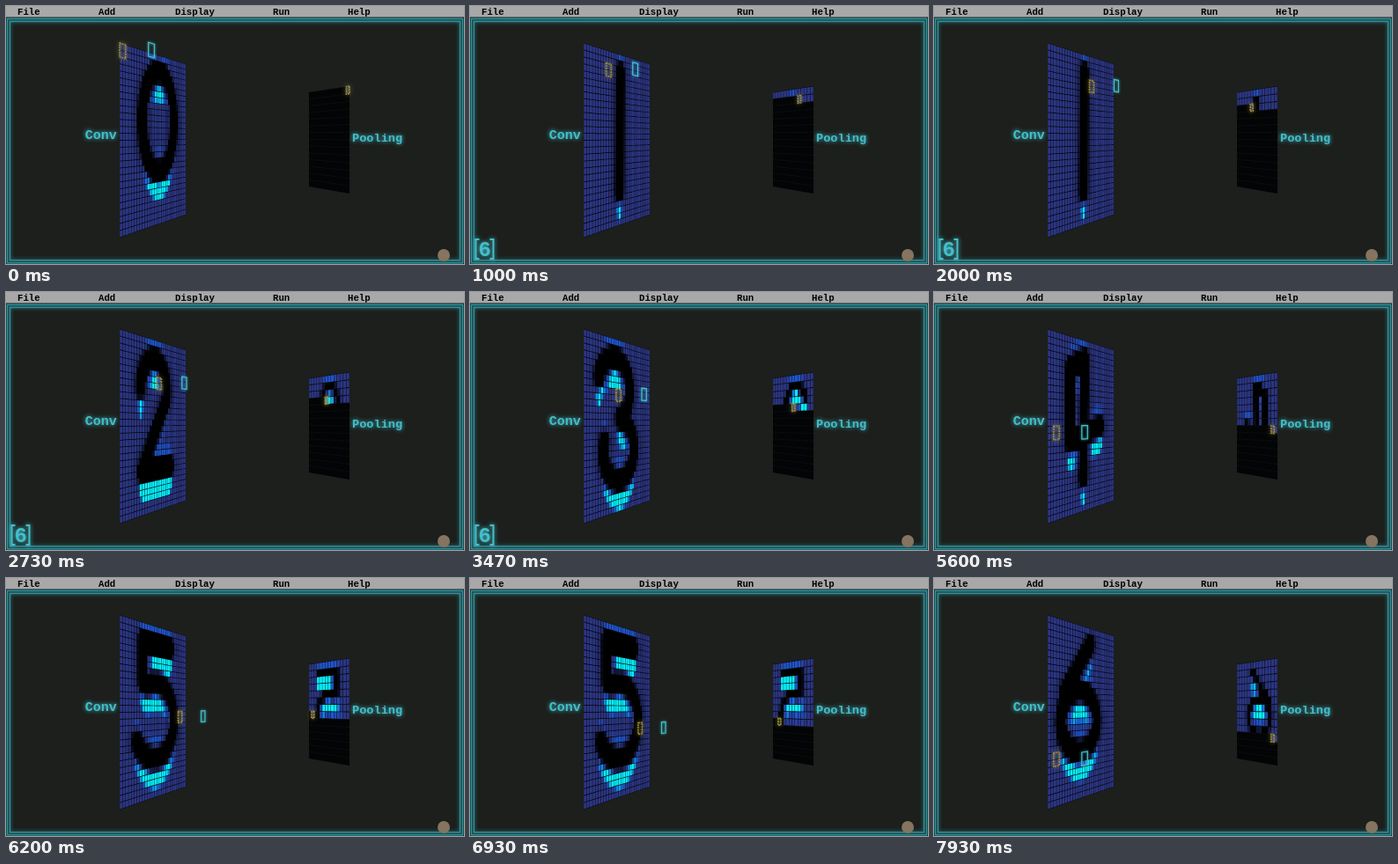
Recreate the animation shown at these times as an HTML page with a canvas. Size 520 px wide and 293 px high, loop 8000 ms.

```html
<!DOCTYPE html>
<html lang="en">
<head>
<meta charset="utf-8">
<title>Pooling scan</title>
<style>
  html, body { margin: 0; width: 100%; height: 100%; overflow: hidden; background: #1c1f1c; }
  canvas { display: block; width: 520px; height: 293px; }
</style>
</head>
<body>
<canvas id="stage" width="520" height="293"></canvas>
<script>
const ctx = document.getElementById('stage').getContext('2d');
const LOOP = 8000, GRID = 28, POOL = 14;
const TEAL = '#43bfca', YELLOW = '#b8a63a';
const MONO = '"Liberation Mono", monospace';

// Panels in perspective: one edge (x0, top y0, height h0) to the other (x1, y1, h1).
const CONV = { x0: 129, y0: 42, h0: 221, x1: 204, y1: 66, h1: 171 };
const POOLED = { x0: 390, y0: 91, h0: 122, x1: 344, y1: 98, h1: 107 };

const clamp = (v, lo = 0, hi = 1) => Math.min(hi, Math.max(lo, v));
const mix = (a, b, t) => a + (b - a) * t;
const times = (n, fn) => Array.from({ length: n }, (_, i) => fn(i));

// Elliptic arc as a polyline; angles in turns, clockwise from the right.
function arc(cx, cy, rx, ry, from = 0, to = 1) {
  return times(17, i => {
    const angle = 2 * Math.PI * mix(from, to, i / 16);
    return [cx + rx * Math.cos(angle), cy + ry * Math.sin(angle)];
  });
}

// Digits 0 to 6 as strokes on the 28 x 28 grid.
const DIGITS = [
  [arc(15, 11, 7, 8.4)],
  [[[13.8, 3], [13.4, 22.5]]],
  [[...arc(13, 8, 5.5, 5, 0.5, 1.05), [8, 21], [20, 21]]],
  [arc(11.5, 8, 6.5, 5, 0.55, 1.2), arc(13.5, 18, 6.5, 5, 0.8, 1.55)],
  [[[14, 3], [8.2, 5], [8, 16.5], [21, 14]], [[14, 3], [13.3, 22.5]]],
  [[[20, 3], [8.3, 3], [8.3, 9], ...arc(13.5, 15.5, 8.5, 6.3, 0.68, 1.42)]],
  [[[16.5, 2.5], [6, 11]], arc(12, 15.5, 7.5, 5)]
];

function segmentDistance(x, y, [ax, ay], [bx, by]) {
  const dx = bx - ax, dy = by - ay;
  const t = clamp(((x - ax) * dx + (y - ay) * dy) / (dx * dx + dy * dy));
  return Math.hypot(x - ax - dx * t, y - ay - dy * t);
}

function ink(strokes, x, y) {
  let nearest = GRID;
  for (const line of strokes)
    for (let i = 1; i < line.length; i++)
      nearest = Math.min(nearest, segmentDistance(x, y, line[i - 1], line[i]));
  return clamp((2.4 - nearest) / 1.1);
}

// Horizontal edge response: dark on a stroke, bright just below it, weak beside it.
function convolve(strokes) {
  return times(GRID, row => times(GRID, col => {
    const at = (dx, dy) => ink(strokes, col + 0.5 + dx, row + 0.5 + dy);
    const edge = dy => Math.max(0, Math.min(at(-1, dy), at(1, dy)) - at(0, 0));
    const side = Math.max(at(-2, 0), at(2, 0));
    return (1.15 * edge(-3) + 0.35 * edge(2)) * (1 - 0.65 * side) - 0.2 * side - 1.2 * at(0, 0);
  }));
}

const maxPool = map => times(POOL, r => times(POOL, c =>
  Math.max(...[0, 1, 2, 3].map(i => map[2 * r + (i >> 1)][2 * c + i % 2]))));

const convMaps = DIGITS.map(convolve);
const poolMaps = convMaps.map(maxPool);

const RAMP = [[-1, [0, 0, 0]], [0, [44, 54, 130]], [0.45, [28, 92, 220]], [0.85, [6, 240, 252]]];
function shade(value) {
  const v = clamp(value, -1, 0.85);
  const i = Math.max(1, RAMP.findIndex(stop => v <= stop[0]));
  const [a, from] = RAMP[i - 1], [b, to] = RAMP[i];
  return `rgb(${from.map((n, k) => Math.round(mix(n, to[k], (v - a) / (b - a))))})`;
}

function project(p, s, r) {
  const q = p.h0 / p.h1, u = q * s / (1 + (q - 1) * s);
  return [mix(p.x0, p.x1, u), mix(p.y0, p.y1, u) + r * mix(p.h0, p.h1, u)];
}

function quad(p, s0, r0, s1, r1) {
  ctx.beginPath();
  for (const [s, r] of [[s0, r0], [s1, r0], [s1, r1], [s0, r1]]) ctx.lineTo(...project(p, s, r));
  ctx.closePath();
}

function cell(panel, n, col, row, value) {
  quad(panel, (col + 0.05) / n, (row + 0.05) / n, (col + 0.95) / n, (row + 0.95) / n);
  ctx.fillStyle = shade(value);
  ctx.fill();
}

function glow(color, blur, draw) {
  ctx.save();
  ctx.strokeStyle = ctx.fillStyle = ctx.shadowColor = color;
  ctx.shadowBlur = blur;
  draw();
  ctx.restore();
}

function label(text, x, y, size) {
  ctx.font = `bold ${size}px ${MONO}`;
  ctx.fillText(text, x, y);
}

function drawChrome() {
  ctx.fillStyle = '#1c1f1c';
  ctx.fillRect(0, 0, 520, 293);
  glow('#2f929c', 4, () => {
    ctx.lineWidth = 1.4;
    ctx.strokeRect(1.5, 14.5, 517, 277.3);
    ctx.strokeRect(4.5, 17.5, 511, 271.3);
  });
  ctx.fillStyle = '#a8a8a8';
  ctx.fillRect(0, 0, 520, 12.5);
  ctx.fillStyle = '#000';
  [['File', 13], ['Add', 105], ['Display', 192], ['Run', 303], ['Help', 388]]
    .forEach(([text, x]) => label(text, x, 9.5, 10.7));
  ctx.fillStyle = '#85745f';
  ctx.beginPath();
  ctx.arc(497, 283, 7, 0, 7);
  ctx.fill();
}

function drawPanels(digit, step) {
  for (const panel of [CONV, POOLED]) {
    quad(panel, 0, 0, 1, 1);
    ctx.fillStyle = '#030405';
    ctx.fill();
  }
  convMaps[digit].forEach((line, row) => line.forEach((v, col) => cell(CONV, GRID, col, row, v)));

  ctx.strokeStyle = 'rgba(90,100,95,.3)';
  ctx.lineWidth = 0.6;
  ctx.setLineDash([1.5, 1.5]);
  for (let row = 1; row < POOL; row++) {
    ctx.beginPath();
    ctx.moveTo(...project(POOLED, 0, row / POOL));
    ctx.lineTo(...project(POOLED, 1, row / POOL));
    ctx.stroke();
  }
  ctx.setLineDash([]);
  for (let i = 0; i <= step; i++) {
    const row = Math.floor(i / POOL), col = i % POOL;
    cell(POOLED, POOL, col, row, poolMaps[digit][row][col]);
  }
}

function drawCursors(step) {
  const col = step % POOL, row = Math.floor(step / POOL);
  const box = [col / POOL, row / POOL, (col + 1) / POOL, (row + 1) / POOL];
  const x = project(CONV, box[0], 0)[0];
  const lift = 0.148 * mix(CONV.h0, CONV.h1, (x - CONV.x0) / (CONV.x1 - CONV.x0));
  glow(YELLOW, 5, () => {
    ctx.lineWidth = 1.6;
    ctx.globalAlpha = 0.8;
    ctx.setLineDash([2, 0.8]);
    for (const panel of [CONV, POOLED]) { quad(panel, ...box); ctx.stroke(); }
  });
  glow(TEAL, 3, () => {
    ctx.translate(lift, -0.8);
    ctx.lineWidth = 1.2;
    quad(CONV, ...box);
    ctx.stroke();
  });
}

function drawLabels(showIndex) {
  glow(TEAL, 5, () => {
    label('Conv', 89.7, 150.5, 15);
    label('Pooling', 393, 153.5, 13.6);
    if (!showIndex) return;
    label('6', 9.4, 284, 24);
    ctx.lineWidth = 2;
    ctx.stroke(new Path2D('M10.5 265H6.5V287H10.5M22.5 265H26.5V287H22.5'));
  });
}

function frame(now) {
  const t = now % LOOP;
  const step = Math.floor(0.7 + t * 0.0177);
  const digit = Math.floor((t + 360) / 1240);
  drawChrome();
  drawPanels(digit, step);
  drawCursors(step);
  drawLabels(t >= 1000 && t < 5200);
}

function tick() {
  frame(performance.now());
  requestAnimationFrame(tick);
}
tick();
</script>
</body>
</html>
```
